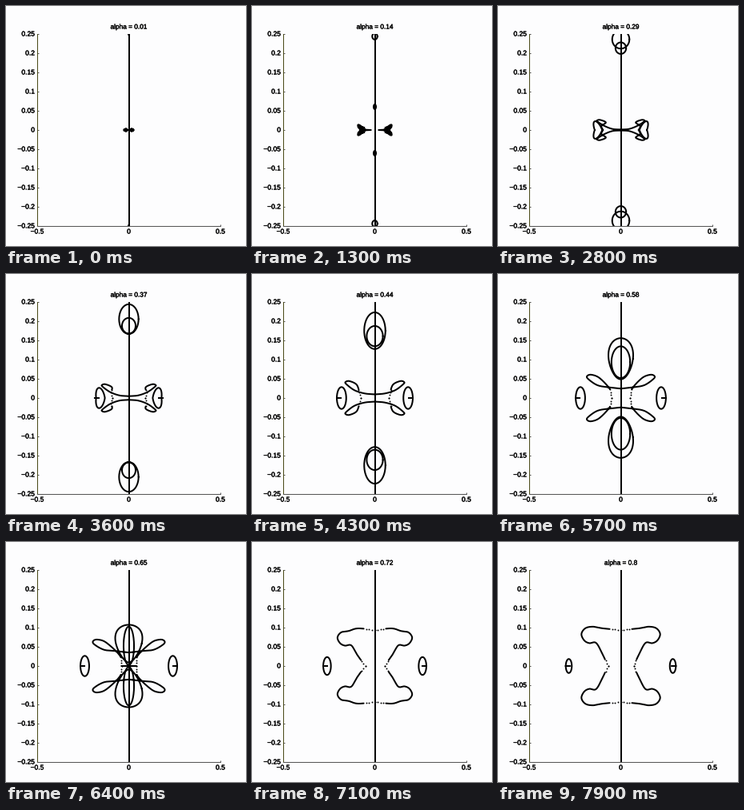
These frames come from a looping animation (300x300 px, 8 s). A matplotlib script:

```python
import numpy as np
import matplotlib.pyplot as plt
from matplotlib.animation import FuncAnimation
from matplotlib.patheffects import withStroke

SIZE, DPI, FRAMES = 300, 100, 80
PX = 72 / DPI                      # points per pixel
BLACK, BG = "#000000", "#fdfdfe"
SX, SY = 229, 480                  # pixels per data unit
MERGE = 0.665                      # alpha where wings and outer loops join
T = np.linspace(0, 2 * np.pi, 121)

plt.rcParams["font.family"] = "Liberation Sans"


def ramp(x, lo, hi):
    return float(np.clip((x - lo) / (hi - lo), 0, 1))


def spline(pts, n=14):
    """Catmull-Rom curve through the points."""
    pts = np.array(pts, float)
    p = np.vstack([2 * pts[0] - pts[1], pts, 2 * pts[-1] - pts[-2]])
    t = np.linspace(0, 1, n, endpoint=False)[:, None]
    out = [b + .5 * t * (c - a + t * (2 * a - 5 * b + 4 * c - d + t * (3 * (b - c) + d - a)))
           for a, b, c, d in zip(p, p[1:], p[2:], p[3:])]
    return np.vstack(out + [pts[-1:]])


def split(curve, head=0, tail=0, gap=3.6):
    """Solid middle part and sparse dots at the two ends."""
    s = np.r_[0, np.cumsum(np.hypot(*np.diff(curve, axis=0).T))]

    def along(q):
        return np.c_[np.interp(q, s, curve[:, 0]), np.interp(q, s, curve[:, 1])]

    solid = along(np.linspace(head, s[-1] - tail, 160))
    dots = along(np.r_[np.arange(0, head, gap), s[-1] - np.arange(0, tail, gap)])
    return solid, dots


def mirror(pts):
    return [pts * (x, y) for x in (1, -1) for y in (1, -1)]


# All shapes are in pixel offsets from the origin, upper right quadrant.

def tip(a):
    return 55 * np.sqrt(a), max(52 * a - 3.5, 1)


def wing(a):
    """Thin lobe from the centre line out to the tip and back."""
    tx, ty = tip(a)
    x0 = 36 * a * ramp(a, .28, .14)
    y0 = max(65 * a ** 3 - 1, 0)
    back = min(35 - 40 * a, .75 * tx)
    return spline([
        (x0, y0),
        (x0 + .35 * (tx - x0), y0 + .06 * ty),
        (.7 * tx, y0 + (.55 - .45 * a) * (ty - y0)),
        (.98 * tx, .9 * ty), (tx, 1.04 * ty), (.87 * tx, 1.09 * ty),
        (.63 * tx, (.7 + .4 * a) * ty),
        (back + 2, .42 * ty), (back, 0)])


def merged(a):
    """Single outline left after the wings meet the outer loops."""
    tx, ty = tip(a)
    shape = [(.7, 1.29), (.9, 1.24), (1, 1.05), (.93, .84), (.8, .75), (.63, .76), (.48, .43)]
    return spline([(0, 45), (.45 * tx, 47)]
                  + [(u * tx, v * ty) for u, v in shape]
                  + [(16 - 50 * (.8 - a), 0)])


def side(a):
    """Outer bubble on the real axis, forked like a fish tail early on."""
    end = 79 * a ** .62
    ry = 1.5 * ramp(a, .3, 0) + 14 * np.sin(np.pi * a / 1.02)
    rx = .43 * ry
    fork = .8 * ry * ramp(a, .42, .14)
    x = end - rx - fork + rx * np.cos(T) + fork * np.abs(np.sin(T))
    return end, np.c_[x, ry * np.sin(T)]


def loop(y, rx, ry, taper=0):
    return np.c_[rx * np.cos(T) * (1 + taper * np.sin(T)), y + ry * np.sin(T)]


def axis_loops(a):
    """Loops that slide down the imaginary axis."""
    loops = []
    if .08 < a < .28:
        loops.append(loop(58 * (1 - a / .28), 1.5, 3))
    if a < .72:
        loops.append(loop(121.5 - 228 * a ** 2, 23 * a * ramp(a, .72, .56), 3 + 50 * a ** 2))
    if .2 < a < MERGE:
        top, bottom = 132 - 293 * a ** 3, 180 - 270 * a
        loops.append(loop((top + bottom) / 2, 20 * np.sqrt(a), (top - bottom) / 2,
                          .35 * ramp(a, .5, .65)))
    return loops


def spectrum(a):
    if a < MERGE:
        line, rest = split(wing(a), 0, 11 * (a > .3))
    else:
        line, rest = split(merged(a), 14, 9)
    end, bubble = side(a)
    solid = mirror(line) + [bubble, bubble * (-1, 1)]
    if a > .3:
        solid += mirror(np.array([(end - 5, 0), (end, 0)]))
    if .6 < a < .7:
        solid += mirror(np.array([(2, 0), (9, 0)]))
    for ring in axis_loops(a):
        solid += [ring, ring * (1, -1)]
    return solid, mirror(rest)


def join(parts):
    nan = np.full((1, 2), np.nan)
    xy = np.vstack([q for p in parts for q in (p, nan)])
    return xy[:, 0] / SX, xy[:, 1] / SY


fig = plt.figure(figsize=(SIZE / DPI, SIZE / DPI), dpi=DPI, facecolor=BG)
ax = fig.add_axes([39 / SIZE, 25 / SIZE, SX / SIZE, 240 / SIZE], facecolor=BG)
ax.set(xlim=(-.5, .5), ylim=(-.25, .25))
ax.set_xticks([-.5, 0, .5], ["\u22120.5", "0", "0.5"])
yticks = np.arange(-5, 6) * .05
ax.set_yticks(yticks, [f"{round(y, 2) + 0:g}".replace("-", "\u2212") for y in yticks])
ax.tick_params(direction="in", length=2.5 * PX, width=.8 * PX, pad=3 * PX,
               labelsize=8.5 * PX, color="#333333", labelcolor=BLACK)
ax.tick_params(axis="x", pad=4.5 * PX)
ax.spines[["top", "right"]].set_visible(False)
ax.spines["left"].set(linewidth=PX, color="#4a4a18")
ax.spines["bottom"].set(linewidth=PX, color="#555555")

ax.plot([0, 0], [-.25, .25], color=BLACK, lw=2 * PX, solid_capstyle="butt")
curves, = ax.plot([], [], color=BLACK, lw=2 * PX, solid_capstyle="round")
points, = ax.plot([], [], "o", color=BLACK, ms=1.9 * PX, mew=0)
title = fig.text(153.5 / SIZE, 1 - 28.5 / SIZE, "", ha="center", va="baseline",
                 size=8.3 * PX, color=BLACK)
for label in [title, *ax.get_xticklabels(), *ax.get_yticklabels()]:
    label.set_path_effects([withStroke(linewidth=.25, foreground=BLACK)])


def update(i):
    a = (i + 1) / 100
    solid, dots = spectrum(a)
    curves.set_data(*join(solid))
    points.set_data(*join(dots))
    title.set_text(f"alpha = {a:g}")
    return curves, points, title


anim = FuncAnimation(fig, update, frames=FRAMES, interval=100, repeat=True,
                     repeat_delay=0, blit=False)
plt.show()
```
